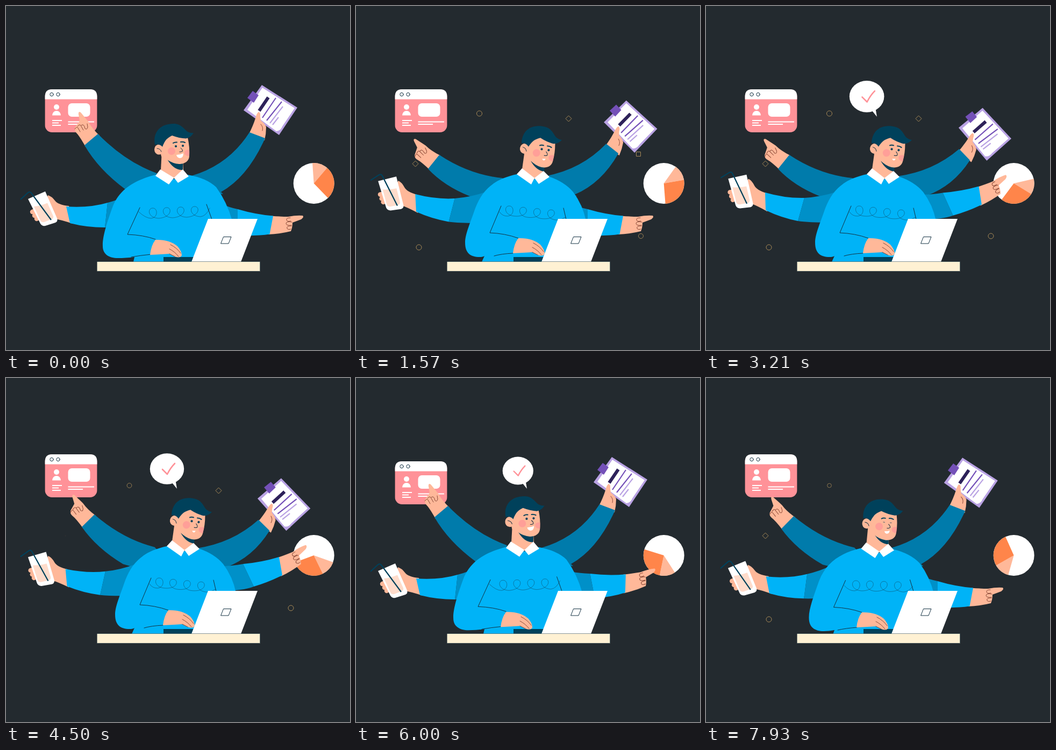
Recreate the animation shown at these times as an HTML page. Size 640x640 px, loop 8 s.

```html
<!DOCTYPE html>
<html lang="en">
<head>
<meta charset="utf-8">
<title>Multitasking</title>
<style>
  html, body { margin: 0; width: 100%; height: 100%; overflow: hidden; background: #232a2f; }
  svg { display: block; width: 100vw; height: 100vh; }
  .white { fill: #fff; }
  .skin { fill: #ffb899; }
  .navy { fill: #00415b; }
  .bright { fill: #00b3f7; }
  .shade { fill: #0090c8; }
  .deep { fill: #007bab; }
  .line { fill: none; stroke: #143243; stroke-width: 1; stroke-linecap: round; stroke-linejoin: round; }
  .crease { fill: none; stroke: #8a4a38; stroke-width: 1; stroke-linecap: round; }
  .rule { fill: none; stroke: #fff; stroke-width: 2; }
  .spark { fill: none; stroke: #a88a58; stroke-width: 1; }
</style>
</head>
<body>
<svg viewBox="0 0 640 640">
  <g id="sparks" class="spark"></g>

  <!-- pie chart -->
  <g transform="translate(572.7 330)">
    <circle class="white" r="38"/>
    <g id="pie"></g>
  </g>

  <!-- browser card -->
  <g id="card">
    <rect x="72.600" y="155" width="96.800" height="80" rx="13" fill="#ff9298"/>
    <path class="white" d="M72.600 173.500V168Q72.600 155 85.600 155H156.400Q169.400 155 169.400 168V173.500Z"/>
    <g class="line"><circle cx="85" cy="164.500" r="3.200"/><circle cx="97" cy="164.500" r="3.200"/></g>
    <circle class="white" cx="94" cy="188" r="5"/>
    <path class="white" d="M86 203.500Q87 195 94 195T102 203.500Z"/>
    <rect class="white" x="115.500" y="181" width="41" height="25" rx="7"/>
    <path class="rule" d="M86 213H104M86 217.500H98M86 222H102M115.500 215.500H164M115.500 220H143"/>
  </g>

  <!-- pointing at the card -->
  <g data-k="press" data-move="158.5 248.5 144.5 290 -17">
    <path class="skin" d="M174 241Q160 228 153 215L149 210L139 198Q134 195 135 202L137 214L129 225Q126 230 130 235Q137 242 148 262Z"/>
    <path class="crease" d="M128 229Q132 223 134 227L138 234M133 224Q138 218 140 224L144 231M140 222Q145 218 147 228Q151 231 152 225L151 219"/>
  </g>
  <path class="deep" data-k="press" d="M171 238Q222 290 280 311L300 340L240 350L222 341Q172 304 146 259Z"
        data-b="M155 277Q211 314 272 320L300 340L240 356L212 354Q164 335 134 303Z"/>

  <!-- clipboard -->
  <g data-k="board" data-move="467.5 240.5 483 278 14.5">
    <path fill="#b9a2e3" d="M476 147L542 189L508 240L442 194Z"/>
    <path class="white" d="M477 152L537 190L514 224Q511 232 503 233L449 193Z"/>
    <path fill="#7450b8" d="M459 158L470 166L461 180L449 171Z"/>
    <path fill="none" stroke="#2d2159" stroke-width="6" d="M488 170L471 195"/>
    <path fill="none" stroke="#7450b8" stroke-width="2.200" d="M502 171L477 208M513 178L485 213"/>
    <path fill="none" stroke="#b9a2e3" stroke-width="2.200" d="M515 187L491 218M507 207L496 221"/>
    <path class="skin" d="M452 238Q460 222 464 209Q467 198 470 197Q474 198 473 206L474 213Q482 219 484 225Q484 238 481 250Z"/>
    <path class="crease" d="M474 220Q479 225 477 232"/>
  </g>
  <path class="deep" data-k="board" d="M453 235Q414 296 345 316L350 345L404 350L400 346Q450 318 482 246Z"
        data-b="M471 266Q422 308 355 317L360 345L414 356L410 353Q460 335 491 287Z"/>

  <!-- drink -->
  <g data-k="drink" data-move="115.5 388.5 108.8 364.5 11">
    <path class="skin" d="M117 372Q97 370 91 362Q85 354 78 352L70 375L90 396Q104 398 124 405Z"/>
    <path fill="none" stroke="#ffb899" stroke-width="8.500" stroke-linecap="round" d="M62 378L49 383M64 384L53 390M66 390L57 396"/>
    <path class="white" d="M41 359L73 345L95 395Q97 400 92 403L73 409Q67 410 64 405Z"/>
    <path fill="#ffdccb" d="M52 373Q64 372 77 366.500L88 391Q89 395 84 397L71 402Q66 403 64 399Z"/>
    <path fill="none" stroke="#00415b" stroke-width="2.200" stroke-linejoin="round" d="M27 360L40 348Q44 344 47 348L84 398"/>
  </g>
  <path class="shade" data-k="drink" d="M189 366Q212 360 235 348L225 410Q204 412 184 412Z"
        data-b="M183 357Q215 355 245 345L235 403Q190 403 171 400Z"/>
  <path class="bright" data-k="drink" d="M112 373Q155 376 189 366L184 412Q150 412 119 404Z"
        data-b="M110 347Q148 358 183 357L171 400Q140 394 111 380Z"/>

  <!-- pointing at the chart -->
  <g data-k="chart" data-move="494 407.5 511.2 350 -23.5">
    <path class="skin" d="M493 390.500Q512 392 525 392Q540 389 552 390Q555 393 549 397L533 403Q533 412 530 419Q510 424 487 425Z"/>
    <path class="crease" d="M529 394Q521 394 522 398Q523 402 530 400M532 402Q521 400 521 405Q522 409 531 408M531 409Q521 409 523 414Q525 417 530 415"/>
  </g>
  <path class="shade" data-k="chart" d="M400 368Q416 375 431 378L431 427Q416 425 400 420Z"
        data-b="M400 350Q420 350 441 346L461 388Q440 396 400 396Z"/>
  <path class="bright" data-k="chart" d="M431 378Q465 388 497 390.500L490.500 424.500Q470 428 431 427Z"
        data-b="M441 346Q475 343 508 333L514 367Q488 380 461 388Z"/>

  <!-- body -->
  <g id="body">
    <path class="bright" data-k="lean" d="M278 314C240 324 212 340 199 372C188 402 179 430 180 447C180 462 192 469 208 469Q222 469 239 467L237 476L420 476L421 400Q411 364 391 337Q373 320 338 314L313 322Z"
          data-b="M299 313C258 322 236 340 222 376C212 405 203 425 203 440C203 460 213 467 230 467Q236 467 239 465L234 476L420 476L428 400Q422 370 404 346Q388 327 358 317L332 322Z"/>
    <path class="line" data-k="lean" d="M249 375L226 425Q255 426 278 434M233 467Q250 464 270 462M373 369L383 397"
          data-b="M270 372L249 422Q277 423 302 432M257 465Q270 461 292 460M386 376L391 397"/>
    <path id="wave" class="line" stroke-opacity=".45" data-k="lean"/>
    <path class="skin" data-k="lean" d="M290 268L288 306L313 321L330 305L329 288Z"
          data-b="M314 268L309 304L332 322L349 308L351 290Z"/>
    <path class="navy" data-k="lean" d="M300 285Q312 292 329 290L329 305Q312 306 300 285Z"
          data-b="M325 288Q335 297 351 297L350 308Q335 306 325 288Z"/>
    <path class="white" data-k="lean" d="M287 304L278 316L303 332L312.500 319.500L320 329L340 317L329 304L312.500 319.500Z"
          data-b="M309 302L299 313L326 332L332 320L340 331L360 318L349 307L332 320Z"/>
  </g>

  <g id="head">
    <path class="skin" d="M285 262Q300 242 309 240Q325 246 338 245Q342 262 341 278C341 290 331 294 322 294Q310 293 300 286L289 280Z"/>
    <ellipse class="skin" cx="284.500" cy="267" rx="8.500" ry="9.500"/>
    <path class="line" stroke-width="1.300" d="M281 265Q287 265 289 271"/>
    <path class="navy" d="M277 258C273 238 284 219 312 219C326 219 331 229 338 234Q344 237 349 236Q344 245 335 246.500Q322 246 309 241Q301 245 297 250Q293 256 291 262Q286 256 277 258Z"/>
    <g fill="#ff9298" opacity=".65"><circle cx="308" cy="270" r="7"/><path d="M341 267.500Q332 267 332 273T341 279Z"/></g>
    <path fill="none" stroke="#00415b" stroke-width="2" stroke-linecap="round" d="M311 255Q314 253 318 253.500M325 253Q329 252 333 254"/>
    <g id="eyes" class="navy"><circle cx="316" cy="261" r="2.100"/><circle cx="329" cy="260" r="2.100"/></g>
    <path class="line" stroke-width="1.200" d="M325 264Q329 267 328.500 270Q326 272 323 271.500"/>
    <path id="mouth" class="white" d="M317 277Q324 277 330 274Q330 283 323 283Q318 282 317 277Z"/>
  </g>

  <!-- desk -->
  <path class="navy" d="M293 467H350V476H293Z"/>
  <g id="typing">
    <path class="skin" d="M278 435Q270 445 268 463Q290 462 304 461L314 466Q324 470 327 464Q327 456 319 447Q304 434 278 435Z"/>
    <path class="crease" d="M306 444Q318 450 325 460M304 452Q314 457 321 466M304 461L314 466"/>
  </g>
  <path class="white" d="M376 396H468L437 476H345Z"/>
  <path class="line" d="M405 429.500H419L414 442H400Z" stroke-width="1.200"/>
  <rect x="169.200" y="475.700" width="303.500" height="17.800" fill="#fff1d3" stroke="#143243" stroke-width=".5"/>

  <!-- speech bubble -->
  <g id="bubble">
    <path class="white" d="M305 190L318 206L315 188Z"/>
    <ellipse class="white" cx="299.500" cy="169" rx="31.700" ry="28.800"/>
    <path fill="none" stroke="#ff9298" stroke-width="2.600" stroke-linecap="round" stroke-linejoin="round" d="M291 170L300 179Q306 167 314 159"/>
  </g>
</svg>
<script>
  const LOOP = 8000, CYCLE = 7140;
  const $ = id => document.getElementById(id);
  const all = sel => [...document.querySelectorAll(sel)];
  const NUMBER = /-?[\d.]+/g;

  const lerp = (a, b, k) => a + (b - a) * k;
  const ramp = (p, from, to) => {
    const u = Math.min(1, Math.max(0, (p - from) / (to - from)));
    return u * u * (3 - 2 * u);
  };
  // goes 0 to 1 over a..b and back over c..d
  const swing = (p, [a, b, c, d]) => ramp(p, a, b) - ramp(p, c, d);
  const mixPath = (from, to, k) => {
    const ends = to.match(NUMBER);
    let i = 0;
    return from.replace(NUMBER, v => lerp(+v, +ends[i++], k).toFixed(2));
  };

  const tracks = {
    lean: [190, 1390, 4960, 6160],
    press: [200, 1400, 3830, 5030],
    drink: [457, 1875, 4050, 5250],
    board: [640, 2120, 4250, 5800],
    chart: [2000, 3390, 5300, 6600]
  };

  // looped stitching on the sweater
  function stitch(x0, y0, slope, startX, startY, endX, endY) {
    let d = `M${startX} ${startY}Q${x0 - 13} ${y0 + 10} ${x0 - 3} ${y0 + 10}`, x, y;
    for (let i = 0; i < 4; i++) {
      x = x0 + 26 * i;
      y = y0 + slope * i;
      d += `C${x + 10} ${y + 9} ${x + 10} ${y - 9} ${x} ${y - 9}C${x - 10} ${y - 9} ${x - 10} ${y + 9} ${x + 11} ${y + 10}`;
    }
    return d + `Q${lerp(x + 11, endX, .6)} ${y + 9} ${endX} ${endY}`;
  }
  $('wave').setAttribute('d', stitch(273, 385, -1, 247, 383, 379, 376));
  $('wave').dataset.b = stitch(285, 381, 2.4, 267, 383, 390, 393);

  function sector(fromDeg, toDeg, color) {
    const at = deg => {
      const a = deg * Math.PI / 180;
      return `${38 * Math.sin(a)} ${-38 * Math.cos(a)}`;
    };
    return `<path fill="${color}" d="M0 0L${at(fromDeg)}A38 38 0 0 1 ${at(toDeg)}Z"/>`;
  }
  $('pie').innerHTML = sector(0, 44.5, '#ffb899') + sector(44.5, 140, '#ff854a');

  const marks = {
    circle: '<circle r="5"/>',
    diamond: '<path d="M0 -5.500L5.500 0L0 5.500L-5.500 0Z"/>',
    square: '<path d="M-4 -4H4V4H-4Z"/>'
  };
  const sparks = [
    ['diamond', 110.5, 293.5, [250, 650, 4150, 4600]],
    ['circle', 117, 449, [350, 750, 3950, 4400]],
    ['circle', 229.5, 200, [500, 920, 4400, 4850]],
    ['diamond', 395.5, 209.5, [800, 1200, 4600, 5050]],
    ['square', 525.5, 275.5, [1000, 1400, 4350, 4800]],
    ['circle', 530, 428, [1200, 1660, 5130, 5580]]
  ];
  $('sparks').innerHTML = sparks.map(s => `<g>${marks[s[0]]}</g>`).join('');

  const morphs = all('[data-b]').map(el => ({ el, from: el.getAttribute('d'), to: el.dataset.b, k: el.dataset.k }));
  const limbs = all('[data-move]').map(el => ({ el, pose: el.dataset.move.split(' ').map(Number), k: el.dataset.k }));

  const place = (el, value) => el.setAttribute('transform', value);
  const scaleAt = (x, y, sx, sy = sx) => `translate(${x} ${y}) scale(${sx} ${sy}) translate(${-x} ${-y})`;

  function draw(t) {
    const p = t % CYCLE;
    const k = {};
    for (const name in tracks) k[name] = swing(p, tracks[name]);

    for (const m of morphs) m.el.setAttribute('d', mixPath(m.from, m.to, k[m.k]));
    for (const { el, pose: [ax, ay, bx, by, turn], k: name } of limbs) {
      const v = k[name];
      place(el, `translate(${lerp(ax, bx, v)} ${lerp(ay, by, v)}) rotate(${turn * v}) translate(${-ax} ${-ay})`);
    }

    const lean = k.lean, dip = Math.sin(Math.PI * lean);
    place($('body'), `translate(0 ${3 * dip})`);
    place($('typing'), `translate(${24 * lean} ${2.5 * dip - 3 * lean})`);
    place($('head'), `translate(${29 * lean} ${4.5 * dip - 2 * lean}) rotate(${12.5 * lean} 283 267)`);
    place($('mouth'), scaleAt(324, 279, 1 - .55 * lean));

    const blink = swing(p, [640, 720, 860, 940]) + swing(p, [5180, 5260, 5400, 5480]);
    place($('eyes'), scaleAt(322, 261, 1, 1 - .8 * blink));

    const lift = swing(p, [200, 660, 860, 1400]) + swing(p, [3830, 4300, 4520, 5030]);
    place($('card'), `translate(0 ${-13 * lift})`);
    place($('pie'), `rotate(${-4 + .0252 * t})`);

    const pop = 1.1 * ramp(p, 2680, 2980) - .1 * ramp(p, 2980, 3300)
      + .1 * ramp(p, 5720, 5920) - 1.1 * ramp(p, 5920, 6220);
    place($('bubble'), scaleAt(318, 206, Math.max(0, pop)));

    sparks.forEach(([, x, y, times], i) =>
      place($('sparks').children[i], `translate(${x} ${y}) scale(${swing(p, times)})`));
  }

  const start = performance.now();
  function tick(now) {
    draw(Math.max(0, now - start) % LOOP);
    requestAnimationFrame(tick);
  }
  draw(0);
  requestAnimationFrame(tick);
</script>
</body>
</html>
```
